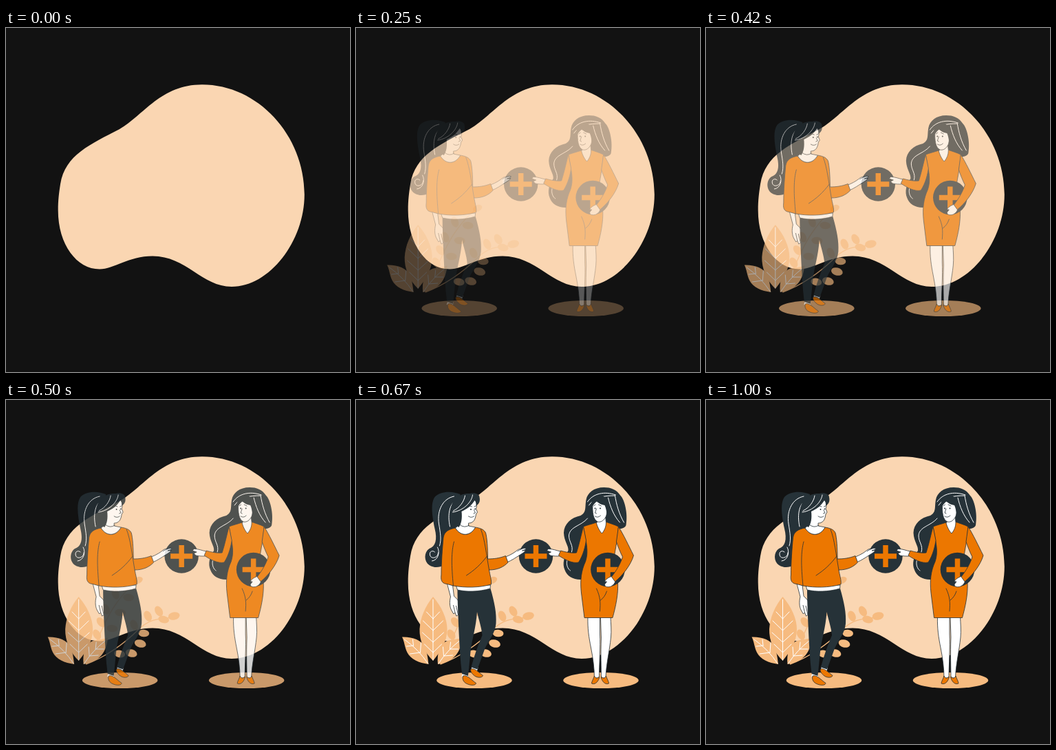
An HTML page that plays this animation: 500 by 500 pixels, repeating every 1040 ms.

```html
<!DOCTYPE html>
<html lang="en">
<head>
<meta charset="utf-8">
<title>Two women sharing a plus</title>
<style>
  html, body { margin: 0; width: 100%; height: 100%; overflow: hidden; background: #121212; }
  svg { display: block; width: 100vw; height: 100vh; }
  .dark { fill: #263238; }
  .orange { fill: #ec7700; }
  .tint { fill: #f6bb80; }
  .skin { fill: #fff; }
  .ink { stroke: #263238; stroke-width: .8; stroke-linejoin: round; }
  .line { fill: none; stroke: #263238; stroke-width: .8; stroke-linecap: round; }
  .shine { fill: none; stroke: #fff; stroke-width: 1; stroke-linecap: round; }
  .stem { fill: none; stroke: #f6bb80; stroke-width: 1.4; }
  .plus { fill: none; stroke: #ec7700; stroke-width: 7.5; }
</style>
</head>
<body>
<svg viewBox="0 0 500 500">
  <rect width="500" height="500" fill="#121212"/>
  <path fill="#fad6b2" d="M285 82.300C366 82.300 433.800 156 433.800 242C433.800 310 383 376 328 376C285 376 262 331.500 213 331.500C178 331.500 157 350.500 136 350.500C103 350.500 75.700 315 75.700 265C75.700 250 77 240 79 227C86 184 123 169 165 147C200 127 225 82.300 285 82.300Z"/>

  <g class="slide tint">
    <ellipse cx="171.5" cy="407.5" rx="54.7" ry="11.6"/>
    <ellipse cx="355.5" cy="407.5" rx="54.7" ry="11.6"/>
  </g>

  <g class="slide">
    <g id="sprigs" class="tint">
      <path class="stem" d="M122 384C150 374 178 354 198 334S236 319 254 315"/>
      <path class="stem" d="M124 382C138 352 150 318 166 296S188 270 198 262"/>
    </g>
    <path class="tint" d="M111.500 286C124 300 132 318 132 333C132 352 122 366 111.500 379C99 367 91.500 350 92 333C93 316 100 300 111.500 286Z"/>
    <path class="tint" d="M66.500 344.500C82 344 94 349 99 358C103 366 104 376 105 384C91 382 79 377 74 367C70 359 70 351 66.500 344.500Z"/>
    <path class="tint" d="M118.500 384C117 368 121 357 130 351C138 347 147 349 154 345C152 366 143 380 118.500 384Z"/>
    <path class="shine" d="M111.500 290V378M111.500 318L102 308M111.500 318L121 308M111.500 335L97 321M111.500 335L126 321M111.500 352L96 338M111.500 352L127 338M111.500 367L99 355M111.500 367L124 355
      M70 348Q91 363 104 383M83 357L82 348M83 357L73 358M93 367L94 353M93 367L78 369
      M119.500 383Q132 364 150 350M127 372L126 359M127 372L140 371M136 362L137 352M136 362L148 362"/>
  </g>

  <g class="slide">
    <path class="dark" d="M151 137C140 132 122 132 114 141C107 151 111 172 114 187C118 203 115 213 106 216C98 221 98 235 106 240C114 245 122 243 127 240L142 200L150 175Z"/>
    <path class="shine" d="M142 140C126 143 117 160 120 180C122 193 124 202 121 212M146 145C136 150 132 165 136 184M119 222C119 230 108 232 107 225C106 220 111 218 114 221M118 214C122 221 119 233 110 234"/>
    <path class="skin ink" d="M132 267L137 286C135 294 136 301 138 305L141.500 311L143.500 309L145.500 314L148 312.500C151 305 151 296 147 290L142 285L140 269ZM141 298L143.500 309M145 299L148 312"/>
    <path class="skin" d="M155 396L153 402L162 405L163 398ZM168 386L167 392L175 395L177 389Z"/>
    <path class="orange ink" d="M155 401C161 399 166 406 174 411.500C174 414.500 168 415.500 162 413C156 411 153.500 406 155 401ZM166.500 391C172 389 178 396 184 400.500C183 404 176 404 172 401C168 398 165 394 166.500 391Z"/>
    <path class="dark" d="M147 275C160 279 180 278 195 274C201 295 204 310 203 325C202 338 193 349 187 361L176 391.500L167 388.500C171 373 176 359 183 342C182 330 178 320 175.500 308C174 331 168 348 166 366L162.500 401L153.500 398C151 378 150 357 149 337C148 312 147 292 147 275Z"/>
    <path class="skin ink" d="M145 270L195 269L194.500 274C178 279 160 279 147 276Z"/>
    <path class="skin ink" d="M217 228C225 225 231 221 235 217.500C239 215.500 244 215 246.500 215.500C247 217 244 218 241 219L246 218.500C245 221 241 223 238 225C232 229 226 233 219 236Z"/>
    <path class="orange ink" d="M144 186C134 188 128 191 126.500 200C125 216 123.500 236 123.500 254C122 264 126 267 132 267.500L141 270C158 273 179 273 196 268C197 262 194 254 193 247C205 247 214 243 220.500 236L217 226.500C208 230 200 231 191 231C191 215 190 200 188 193C185 187 178 186 173 185C166 198 152 199 144 186Z"/>
    <path class="line" d="M142 206C138 220 138 240 141 270M181 188C187 203 189 225 193 247M190 227C180 240 172 247 160 255"/>
    <path class="skin ink" d="M149 160L150 181L144 186C152 199 166 198 173 185L163 183L163 179C170 179 173 174 174 166L176 163L174 158C176 152 175 148 172 144Z"/>
    <path class="dark" d="M137 165C136 145 150 135 165 136C172 134 179 137 179 141C180.500 148 178 151 174 154C174 150 174 148 172 146C167 154 160 159 153 162C154 172 153 179 149 185C141 181 137 172 137 165Z"/>
    <path class="shine" d="M169 138C168 148 156 161 140 163M158 139C157 147 150 157 141 161"/>
    <path class="line" d="M163 155Q165 153 168 155M171.500 155L174 154M171 160L173 164L170.500 165M163 169Q167 172 171 169M150 181Q157 187 164 182"/>
    <circle class="dark" cx="166.500" cy="159" r="1"/><circle class="dark" cx="172.500" cy="158.500" r=".9"/>
  </g>

  <g class="slide">
    <path class="dark" d="M360 127C345 127 336 135 334 145C332 156 335 163 326 168C312 171 302 180 301.500 193C302 206 309 212 308 219C302 227 299 238 303 247C306 256 316 262 328 261C335 250 343 200 348 185L375 185C382 189 390 187 392 182C395 165 390 145 384 139C378 130 370 127 360 127Z"/>
    <path class="shine" d="M336 148C344 136 360 132 377 138M338 153C346 141 360 139 376 139M376 139C378 152 382 166 389 178M366 142C369 155 374 168 383 178M336 172C327 183 310 184 309 197C309 207 316 211 313 221M312 224C303 232 305 244 311 248"/>
    <path class="skin ink" d="M336.500 315C336 332 338 345 341 360C344 375 346 390 346 404L353 404C353 385 355 360 354 340L354 315ZM355 315L356 345C355 370 356 390 356 404L362.500 404C363 385 368 365 370 345C371 335 370 325 369.500 315Z"/>
    <path class="orange ink" d="M346 401C345 405 342 409 342 412C346 414 351 411 353 404L353 402C350 405 348 405 346 401ZM363 401C364 405 367 409 367 412C363 414 358 411 356 404L356 402C359 405 361 405 363 401Z"/>
    <path class="orange ink" d="M349 178C343 180 335 182 330 184L334 206C336 218 336 226 333 235C327 248 325 262 327 280L331.500 316.500L372.500 316.500C377 300 381 282 380 264C379 250 374 240 375 228C376 218 379 208 381 184C375 181 368 179 362 177Z"/>
    <path class="line" d="M349 274C355 287 355 295 354 307M364 278C362 284 359 288 355 291"/>
    <path class="skin ink" d="M352 174L349 179C351 186 354 191 357 194C361 189 363 184 363 178L362 168Z"/>
    <path class="skin ink" d="M343.500 150C343 163 344 174 351 177C356 178 360 175 363 169C365 163 364 156 363 148C356 151 350 149 347 145Z"/>
    <path class="dark" d="M342 156C340 145 346 137 355 138C362 139 367 148 365 168C364 165 363 157 361 153C355 152 352 150 350 147C347 149 345 152 342 156Z"/>
    <path class="line" d="M345 154L347.500 152M352 152L356 154M349 158L347 164L349 165M347 169Q351 172 355 168"/>
    <circle class="dark" cx="347" cy="157.500" r="1"/><circle class="dark" cx="354.500" cy="157.500" r="1"/>

    <circle class="dark" cx="261" cy="227" r="24.700"/>
    <path class="plus" d="M245 227H277M261 211V243"/>
    <circle class="dark" cx="365.500" cy="246.500" r="24.800"/>
    <path class="plus" d="M349.500 246.500H381.500M365.500 230.500V262.500"/>

    <path class="skin ink" d="M297 220C291 219 285 216 279 216.500L277 219L283 221L279 223L282 226C287 227 291 227 295 227Z"/>
    <path class="orange ink" d="M330 184C327 195 324 210 320 222C313 223 304 221 297 219L294 226C303 232 314 238 323 236C330 225 333 212 334 204Z"/>
    <path class="skin ink" d="M372 256C366 258 362 261 361 264L364 264L361 268C361 272 366 272.500 370 271C374 269 376 266 377 262Z"/>
    <path class="orange ink" d="M381 184C388 195 396 212 403 226C399 240 387 255 376 264L371 257C378 248 384 238 387 228C383 220 380 212 378 206Z"/>
  </g>

  <g class="slide">
    <path class="skin ink" d="M234 220C238 217 243 215 246.500 215.500C247 217 244 218 241 219L246 218.500C245 221 241 223 238 225L235 227"/>
  </g>
</svg>
<script>
const LOOP = 1040, FPS = 24, LAST = 24, LEAD = 0.8, TRAVEL = 30;
const groups = document.querySelectorAll('.slide');

// Sprig leaves: centre x, y, angle and half length
const leaves = [
  [228, 307, -120, 8], [212, 314, -115, 8], [235, 319, 15, 8], [250, 314, -12, 8.5],
  [206, 339, 5, 8], [201, 354, 15, 8.5], [188, 368, 15, 8.5], [171, 369, 10, 8], [192, 327, -115, 8],
  [198, 262, -25, 7], [184, 287, 5, 8], [165, 282, -110, 8], [172, 309, 5, 8],
  [151, 304, -115, 8], [144, 323, -130, 8], [160, 332, 5, 8], [138, 341, -120, 8]
];
for (const [x, y, angle, size] of leaves) {
  const leaf = document.createElementNS('http://www.w3.org/2000/svg', 'ellipse');
  leaf.setAttribute('rx', size);
  leaf.setAttribute('ry', size * 0.66);
  leaf.setAttribute('transform', `translate(${x} ${y}) rotate(${angle})`);
  document.getElementById('sprigs').append(leaf);
}

const bezier = (a, b, s) => 3 * a * s * (1 - s) ** 2 + 3 * b * s * s * (1 - s) + s ** 3;

// cubic-bezier(.36, -.01, .5, 1.38), solved by bisection
function ease(x) {
  let low = 0, high = 1;
  for (let i = 0; i < 24; i++) {
    const mid = (low + high) / 2;
    if (bezier(0.36, 0.5, mid) < x) low = mid; else high = mid;
  }
  return bezier(-0.01, 1.38, low);
}

function draw(ms) {
  const step = Math.min(LAST, Math.floor((ms % LOOP + 4.9) * FPS / 1000));
  const progress = ease(Math.min(1, (step + LEAD) / FPS));
  const opacity = step ? Math.min(1, Math.max(0, progress)) : 0;
  for (const group of groups) {
    group.setAttribute('opacity', opacity);
    group.setAttribute('transform', `translate(${(progress - 1) * TRAVEL} 0)`);
  }
}

const start = performance.now();
function tick() {
  draw(performance.now() - start);
  requestAnimationFrame(tick);
}
tick();
</script>
</body>
</html>
```
